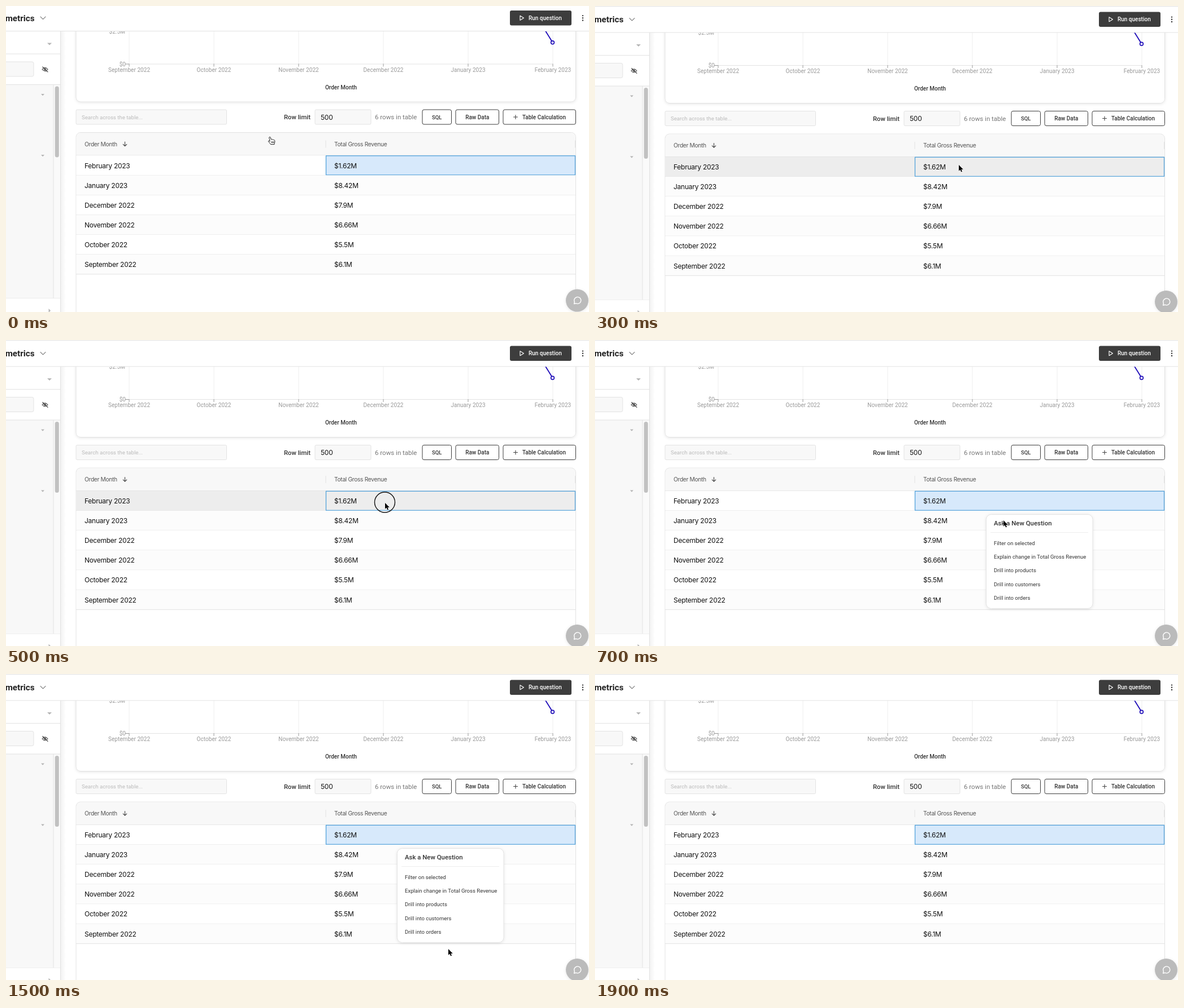
Recreate the animation shown at these times as an HTML page. Size 1032 px wide and 543 px high, loop 2 s.

```html
<!DOCTYPE html>
<html lang="en">
<head>
<meta charset="utf-8">
<title>Drill into a table cell</title>
<style>
html, body { margin: 0; width: 100%; height: 100%; overflow: hidden; background: #fff; }
svg { display: block; width: 1032px; height: 543px; }
text { font: 10px Roboto, sans-serif; fill: #333; }
.mid { text-anchor: middle; }
.end { text-anchor: end; }
.axis { fill: #999; letter-spacing: .05px; }
.bold { font-weight: 500; }
.cell { font: 12px Inter, sans-serif; letter-spacing: -.25px; fill: #111; }
.head { font: 10.3px Inter, sans-serif; letter-spacing: -.35px; fill: #555; }
.label { font-size: 11.5px; }
.item { font-size: 9.55px; fill: #333; }
.line { fill: none; stroke: #e2e2e2; }
.box { fill: #f8f8f8; stroke: #e3e3e3; }
.button { fill: #fff; stroke: #3d3d3d; }
.icon { fill: none; stroke: #444; stroke-width: 1.1; stroke-linecap: round; stroke-linejoin: round; }
.caret { fill: #b5b5b5; }
</style>
</head>
<body>
<svg viewBox="0 0 1032 543">
  <defs>
    <linearGradient id="fade"><stop stop-color="#000" stop-opacity=".05"/><stop offset="1" stop-opacity="0"/></linearGradient>
    <filter id="soft" x="-30%" y="-30%" width="160%" height="160%"><feDropShadow dx="0" dy="1" stdDeviation="2.5" flood-opacity=".1"/></filter>
  </defs>
  <g id="page">
    <rect x="97" y="47" width="9" height="520" fill="url(#fade)"/>

    <rect class="line" x="124" y="-40" width="884.5" height="212.5" rx="8" style="fill:#fff" filter="url(#soft)"/>
    <g id="chart"></g>
    <path d="M211 105.5H218" stroke="#999"/>
    <text class="axis end" x="212" y="109">$0</text>
    <text class="axis end" x="211" y="51">$2.5M</text>
    <path d="M952 42L967.5 67" stroke="#1d0bb8" stroke-width="1.8"/>
    <circle cx="967.5" cy="67.3" r="2.9" fill="#fff" stroke="#1d0bb8" stroke-width="1.6"/>
    <text class="mid bold" x="593" y="150" fill="#555">Order Month</text>

    <rect class="box" x="124" y="186.5" width="266.5" height="26" rx="2"/>
    <text x="134" y="203" style="font-size:9.65px;fill:#bbb">Search across the table...</text>
    <text class="label bold" x="492" y="203.5" style="font-size:11.3px">Row limit</text>
    <rect class="box" x="547" y="186.5" width="99" height="26" rx="2"/>
    <text class="cell" x="557" y="204">500</text>
    <text class="label" x="653" y="203.5" style="fill:#777">6 rows in table</text>
    <rect class="button" x="737" y="186.5" width="51.5" height="26" rx="3"/>
    <rect class="button" x="796" y="186.5" width="76.5" height="26" rx="3"/>
    <rect class="button" x="880" y="186.5" width="128.5" height="26" rx="3"/>
    <text class="mid bold" x="762.7" y="203" style="font-size:9.5px">SQL</text>
    <text class="mid bold" x="834.3" y="203">Raw Data</text>
    <text class="bold" x="914" y="203">Table Calculation</text>
    <path class="icon" d="M898.5 199.5H905.5M902 196V203"/>

    <rect class="line" x="124" y="227" width="884.5" height="400" rx="8" style="fill:#fff"/>
    <path d="M124.5 267.5V235a7.5 7.5 0 0 1 7.5-7.5H1000a7.5 7.5 0 0 1 7.5 7.5V267.5Z" fill="#f8f8f8"/>
    <path class="line" d="M124 267.5H1008M566 241V254M1007.5 241V254"/>
    <text class="head" x="139" y="251">Order Month</text>
    <path class="icon" d="M210.5 243.5V251M207.3 248L210.5 251.2 213.7 248"/>
    <text class="head" x="581" y="251">Total Gross Revenue</text>
    <g id="rows"></g>

    <rect width="96.5" height="580" fill="#fff"/>
    <path class="line" d="M96.5 47V580M0 87.5H96M0 521H96"/>
    <rect class="box" x="-10" y="101.5" width="59" height="26" rx="3"/>
    <path d="M0 142H84V521H0Z" fill="#f8f8f8"/>
    <path d="M84 142H96V521H84Z" fill="#fafafa"/>
    <path class="line" d="M0 142H96M84 142V521"/>
    <rect x="86.7" y="145" width="7" height="126" rx="3.5" fill="#c1c1c1"/>
    <path class="caret" d="M73 68H81L77 72ZM62 158.5H68L65 161.8ZM62 266.5H68L65 269.8ZM75.5 539.5V546.5L79 543Z"/>
    <path class="icon" d="M64 115Q69 108.5 74 115 69 121 64 115ZM64.8 110.5L74 119.5"/>
    <circle class="icon" cx="69" cy="115" r="1.6"/>

    <rect y="-5" width="1032" height="52" fill="#fff"/>
    <path class="line" d="M0 .5H1032M0 47H1032"/>
    <text class="end" x="50.5" y="29" style="font-size:15.2px;font-weight:600;fill:#222">metrics</text>
    <path class="icon" d="M61 21.5L65.5 26 70 21.5" style="stroke:#888"/>
    <rect x="892" y="10.5" width="109" height="26.5" rx="3" fill="#3d3d3d"/>
    <path class="icon" d="M910 19.7V27.7L916.5 23.7Z" style="stroke:#fff"/>
    <text class="bold" x="925" y="27.3" style="fill:#fff">Run question</text>
    <path d="M1021 19.6v0M1021 23.8v0M1021 28v0" stroke="#333" stroke-width="2.4" stroke-linecap="round"/>

    <g filter="url(#soft)"><circle cx="1011" cy="525" r="20" fill="#bbb"/></g>
    <path d="M1005.6 531L1006.4 527.6A6 6 0 1 1 1009 530.2Z" fill="none" stroke="#fff" stroke-width="1.4" stroke-linejoin="round"/>
  </g>

  <g id="menu">
    <rect class="line" x="692.5" y="309.5" width="188.5" height="167" rx="9" style="fill:#fff" filter="url(#soft)"/>
    <path class="line" d="M700 341.5H873" style="stroke:#eee"/>
    <rect id="hover" x="699" width="175" height="24" rx="2" fill="#f0f0f0"/>
    <text class="label bold" x="706" y="329" style="font-size:11.4px">Ask a New Question</text>
    <g id="items"></g>
  </g>

  <circle id="ring" r="18" fill="none" stroke="#111" stroke-width="1.4"/>
  <g id="cursor">
    <path id="arrow" d="M0 0V10.8L2.5 8.5 4.2 12.4 6 11.6 4.4 7.9H7.8Z" stroke="#fff" stroke-width=".9" paint-order="stroke"/>
    <path id="hand" d="M-1.3 1.2Q0-.8 1.3 1.2L2 4.6Q3.2 3.8 4.2 5 5.6 4.3 6.4 5.6 8 5 8.6 6.6 9.4 9.5 8.2 11.2L8 13.6H1.6Q.4 11.5-2.6 8.4-2.8 6.8-1 7.4L.2 8.4ZM3.2 8.3V11.2M5 8.3V11.2M6.8 8.3V11.2" fill="#fff" stroke="#222" stroke-width="1" stroke-linejoin="round"/>
  </g>
</svg>
<script>
const $ = id => document.getElementById(id);
const show = (id, on) => $(id).style.display = on ? '' : 'none';

const revenue = [['February 2023', '$1.62M'], ['January 2023', '$8.42M'], ['December 2022', '$7.9M'],
  ['November 2022', '$6.66M'], ['October 2022', '$5.5M'], ['September 2022', '$6.1M']];
const actions = ['Filter on selected', 'Explain change in Total Gross Revenue',
  'Drill into products', 'Drill into customers', 'Drill into orders'];
const ROW = 35.1, ITEM = 24.2, ITEMS_TOP = 348.3;

$('chart').innerHTML = '<path class="line" d="M218 105.5H968"/>' + revenue.map(([month], i) => {
  const x = 968 - 150 * i;
  return `<path class="line" d="M${x} 40V105" style="stroke:#eee"/><path d="M${x} 105V110" stroke="#999"/>
    <text class="axis mid" x="${x}" y="119.3">${month}</text>`;
}).join('');

$('rows').innerHTML = revenue.map(([month, total], i) => {
  const y = 267.8 + ROW * i;
  return `<rect id="row${i}" x="124.5" y="${y}" width="883.5" height="${ROW}" fill="${i % 2 ? '#fcfcfc' : '#fff'}"/>
    <path class="line" d="M124 ${y + ROW}H1008"/>
    ${i ? '' : `<rect id="picked" x="566.5" y="${y + .5}" width="441" height="34" stroke="#4a9eda" stroke-width="1.2"/>`}
    <text class="cell" x="139" y="${y + 22.2}">${month}</text>
    <text class="cell" x="581" y="${y + 22.2}">${total}</text>`;
}).join('');

$('items').innerHTML = actions.map((name, i) =>
  `<text class="item" x="706" y="${364 + ITEM * i}">${name}</text>`).join('');

// Pointer tip: [time, x, y]
const path = [[0, 467, 232], [100, 487, 242], [200, 555, 258], [300, 644, 282], [400, 671, 289], [500, 671, 289],
  [700, 723, 320], [1100, 762, 418], [1200, 782, 462], [1300, 784, 478], [1500, 783, 488], [2000, 783, 488]];

function pointer(t) {
  const i = path.findIndex(p => p[0] > t);
  const [t0, x0, y0] = path[i - 1], [t1, x1, y1] = path[i];
  const k = (t - t0) / (t1 - t0);
  return [x0 + (x1 - x0) * k, y0 + (y1 - y0) * k];
}

function draw(now) {
  const t = Math.floor(now % 2000 / 100) * 100;
  const [x, y] = pointer(t);
  const open = t >= 600 && t < 1800;
  const item = Math.floor((y - ITEMS_TOP) / ITEM);
  const onItem = open && item >= 0 && item < actions.length;
  const onRow = !open && y > 268 && y < 303;
  const hand = onItem || y < 267;

  $('page').setAttribute('transform', `translate(0 ${t < 100 ? -2.5 : t < 200 ? -.5 : 0})`);
  $('row0').setAttribute('fill', onRow ? '#ededed' : '#fff');
  $('picked').setAttribute('fill', onRow ? '#ededed' : '#d7e9fb');
  show('menu', open);
  show('hover', onItem);
  $('hover').setAttribute('y', ITEMS_TOP + ITEM * item);
  show('ring', t === 400 || t === 500 || t === 1700);
  $('ring').setAttribute('transform', `translate(${x - .5} ${y - 1})`);
  show('cursor', t < 1900);
  $('cursor').setAttribute('transform', `translate(${x} ${y})`);
  show('hand', hand);
  show('arrow', !hand);
  requestAnimationFrame(() => draw(performance.now()));
}
draw(0);
</script>
</body>
</html>
```
